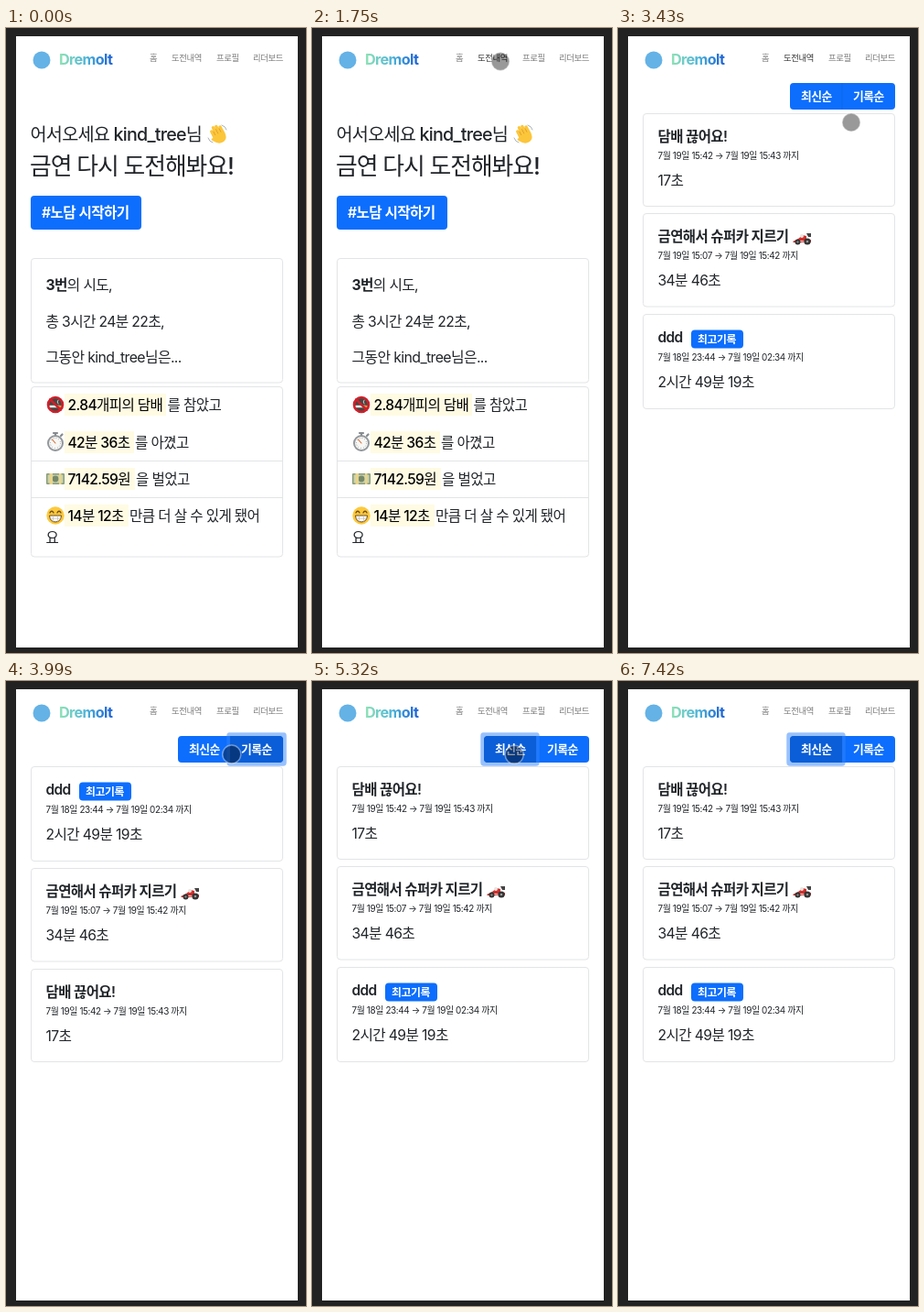
An HTML page for the animation above (7630 ms loop, 328 by 682 pixels).

```html
<!DOCTYPE html>
<html lang="ko">
<head>
<meta charset="utf-8">
<style>
  html, body { margin: 0; width: 100%; height: 100%; overflow: hidden; background: #222; }
  svg { display: block; }
  text {
    font-family: Inter, "Noto Sans CJK KR", "Noto Sans CJK", sans-serif;
    letter-spacing: -.04em;
    white-space: pre;
  }
</style>
</head>
<body>
<svg id="stage" width="328" height="682" viewBox="0 0 328 682">
  <defs>
    <linearGradient id="brand">
      <stop offset="0" stop-color="#8fe3b4"/>
      <stop offset=".5" stop-color="#4cb4d8"/>
      <stop offset="1" stop-color="#1b5fd6"/>
    </linearGradient>
  </defs>
</svg>
<script>
const LOOP = 7630, STEP = 70;
const OPEN = 1820, HOVER = 1680, BY_RECORD = 3850, BY_DATE = 5110;
const BLUE = '#0d6efd', DARK = '#0b5ed7', INK = '#212529', LINE = '#e3e4e6';

const text = (x, cy, size, str, weight = 400, fill = INK, extra = '') =>
  `<text x="${x}" y="${cy + size * .365}" font-size="${size}" font-weight="${weight}" fill="${fill}" ${extra}>${str}</text>`;
const rect = (x, y, w, h, fill, r = 0, extra = '') =>
  `<rect x="${x}" y="${y}" width="${w}" height="${h}" rx="${r}" fill="${fill}" ${extra}/>`;
const box = (y, h) => rect(27.5, y + .5, 275, h, '#fff', 3.5, `stroke="${LINE}"`);
const at = (x, y, body) => `<g transform="translate(${x} ${y})">${body}</g>`;
const group = (id, body) => `<g id="${id}">${body}</g>`;
const stroke = (color, width) => `fill="none" stroke="${color}" stroke-width="${width}" stroke-linecap="round"`;

const icons = {
  wave: `<g transform="rotate(-28)"><path d="M-5-6V2M-1.5-9V1M2-8.5V1M5.5-6V2" ${stroke('#fcc63a', 3.4)}/>
    <path d="M-6.5-1Q0-4 7-1V4Q6 10 0 10Q-5 10-9 3Q-10 0-6.5 1Z" fill="#fcc63a"/>
    <path d="M-3.2-5V-1M.3-6V-1M3.8-5V-1" ${stroke('#d9952b', .7)}/></g>
    <path d="M4-10Q8-9 9-5M-11 4Q-10 8-6 9" ${stroke('#a9b3ba', 1)}/>`,
  noSmoking: `<circle r="8.3" fill="#4a4541"/><path d="M-6 2H4" ${stroke('#f4f0e8', 2.4)}/>
    <path d="M4 2H6" ${stroke('#e8903a', 2.4)}/><path d="M3-1Q1-3 3-5" ${stroke('#ccc', 1)}/>
    <circle r="8" ${stroke('#d0202b', 2.6)}/><path d="M-5.7-5.7L5.7 5.7" ${stroke('#d0202b', 2.6)}/>`,
  watch: `<path d="M0-10V-7M-2-10H2M6-7L7.5-8.5" ${stroke('#858a8e', 2.2)}/>
    <circle cy="1" r="8" fill="#f7f7f5" stroke="#92979b" stroke-width="2"/>
    <circle cy="1" r="5.5" fill="none" stroke="#777" stroke-width="1" stroke-dasharray=".6 2.28"/>
    <path d="M0 1L-3.5-3" ${stroke('#d86a2c', 1.1)}/>`,
  cash: rect(-10, -6, 20, 12, '#8a9c78', 1) + rect(-8.5, -4.5, 17, 9, '#c8d2b2') +
    `<circle r="3.4" fill="#74896a"/>` + rect(-6.5, -6, 3.5, 12, '#e9d48a') + rect(4, -6, 2.5, 12, '#e9d48a'),
  grin: `<circle r="9.7" fill="#fdc93b"/><path d="M-6.5 0H6.5Q6 7 0 7T-6.5 0Z" fill="#fff" stroke="#6b4a1b" stroke-width="1"/>
    <path d="M-6 3.2H6M-2.5 0V6.5M2.5 0V6.5" ${stroke('#b9b3a8', .6)}/>
    <path d="M-6-3Q-4-6.5-2-3M2-3Q4-6.5 6-3" ${stroke('#6b4a1b', 1.4)}/>`,
  car: `<path d="M-10 3L-4 0L1-4L5-3V0L10 1V4H-9Z" fill="#cf2f2c"/><path d="M5-6H10V-2H7Z" fill="#444"/>
    <path d="M-6 2L3 3" ${stroke('#f4e9e4', 1)}/><circle cx="0" cy="-3" r="2" fill="#e9e4de"/>
    <circle cx="-4.5" cy="3.5" r="3" fill="#333"/><circle cx="6" cy="3" r="3.6" fill="#333"/>
    <circle cx="-4.5" cy="3.5" r="1.1" fill="#999"/><circle cx="6" cy="3" r="1.3" fill="#999"/>`
};

const nav = [[157, '홈'], [181, '도전내역'], [230, '프로필'], [270, '리더보드']]
  .map(([x, s], i) => text(x, 32.5, 9.4, s, 400, '#7b7b7b', `id="nav${i}"`)).join('');

const header = '<circle cx="39" cy="35" r="9.5" fill="#64b2e6"/>' +
  text(58, 34.5, 16.2, 'Dremolt', 700, 'url(#brand)') + nav;

const stats = [
  [411, 'noSmoking', '2.84개피의 담배', 175, 176.5, '를 참았고'],
  [452, 'watch', '42분 36초', 140, 141, '를 아꼈고'],
  [492, 'cash', '7142.59원', 141, 142, '을 벌었고'],
  [532, 'grin', '14분 12초', 134, 135, '만큼 더 살 수 있게 됐어']
].map(([y, icon, value, end, x, rest]) =>
  at(54, y, icons[icon]) + rect(64, y - 12, end - 64, 24, '#fffbe3') +
  text(67.5, y, 15.6, value, 500, '#000') + text(x, y, 15.6, rest)).join('');

const home =
  text(26.5, 115.5, 19.7, '어서오세요 kind_tree님', 500) + at(232, 116, icons.wave) +
  text(26, 151, 25.8, '금연 다시 도전해봐요!', 500) +
  rect(27, 183, 121, 37, BLUE, 4) + text(39, 201.5, 15.7, '#노담 시작하기', 600, '#fff') +
  box(251, 135.5) +
  text(43.5, 280.5, 15.7, '<tspan font-weight="700">3번</tspan>의 시도,') +
  text(43.5, 320, 15.7, '총 3시간 24분 22초,') +
  text(43.5, 359.5, 15.9, '그동안 kind_tree님은...') +
  box(391, 185.5) + rect(28, 472, 275, 1, LINE) + rect(28, 512, 275, 1, LINE) +
  stats + text(43.5, 556, 15.6, '요');

const card = (id, h, title, date, time, extra = '', dy = 0) => group(id,
  box(0, h) + text(43.5, 25.7, 15.5, title, 600) + extra +
  text(43.5, 46.5 + dy, 9.95, date) + text(43.5, 73.6 + dy, 15.7, time));

const cards =
  card('quit', 101, '담배 끊어요!', '7월 19일 15:42 → 7월 19일 15:43 까지', '17초') +
  card('super', 101.5, '금연해서 슈퍼카 지르기', '7월 19일 15:07 → 7월 19일 15:42 까지', '34분 46초',
    at(201, 28, icons.car)) +
  card('best', 103, 'ddd', '7월 18일 23:44 → 7월 19일 02:34 까지', '2시간 49분 19초',
    rect(80, 17.5, 57, 20, BLUE, 4) + text(87, 27.5, 11.9, '최고기록', 700, '#fff'), .8);

const left = 'M192 60H245V89H192Q188 89 188 85V64Q188 60 192 60Z';
const right = 'M245 60H299Q303 60 303 64V85Q303 89 299 89H245Z';
const focus = (id, d, x, w) => group(id,
  `<path fill-rule="evenodd" fill="rgba(49,132,253,.5)" d="M${x - 1} 56.3H${x + w + 1}Q${x + w + 3.7} 56.3 ${x + w + 3.7} 60V89Q${x + w + 3.7} 92.7 ${x + w} 92.7H${x}Q${x - 3.7} 92.7 ${x - 3.7} 89V60Q${x - 3.7} 56.3 ${x - 1} 56.3Z${d}"/>` +
  `<path d="${d}" fill="${DARK}"/>`);

const history = cards +
  `<path d="${left}${right}" fill="${BLUE}"/>` + rect(244.5, 60, 1, 29, '#0c66ea') +
  focus('focusLeft', left, 188, 57) + focus('focusRight', right, 245, 58) +
  text(200, 74.5, 12.8, '최신순', 600, '#fff') + text(257, 74.5, 12.8, '기록순', 600, '#fff');

const stage = document.getElementById('stage');
stage.insertAdjacentHTML('beforeend',
  rect(0, 0, 328, 682, '#222') + rect(11, 9, 308, 667, '#fff') + header +
  group('home', home) + group('history', history) +
  '<circle id="touch" r="10" fill="rgba(0,0,0,.4)" stroke="rgba(255,255,255,.4)" stroke-width="1.5"/>');

const $ = id => document.getElementById(id);
const show = (id, on) => $(id).setAttribute('visibility', on ? 'inherit' : 'hidden');
const move = (id, x, y) => $(id).setAttribute('transform', `translate(${x} ${y})`);

// Pointer path: time, x, y
const path = [
  [70, 236, 640], [350, 211, 152], [420, 211, 152], [700, 184, 24], [1050, 184, 24],
  [1120, 208, 48], [1190, 197, 42], [1260, 197, 42], [1400, 206, 36.5], [2030, 206, 36.5],
  [2310, 189, 207], [2800, 192, 207], [3430, 255, 103], [3780, 247, 80], [4410, 246, 80],
  [5110, 221, 80], [5880, 222, 82], [6650, 238, 667], [6930, 240, 695]
];

function pointer(t) {
  const i = path.findIndex(p => p[0] >= t);
  if (i < 1) return path[i < 0 ? path.length - 1 : 0].slice(1);
  const [t0, x0, y0] = path[i - 1], [t1, x1, y1] = path[i];
  const k = (t - t0) / (t1 - t0), e = k * k * (3 - 2 * k);
  return [x0 + (x1 - x0) * e, y0 + (y1 - y0) * e];
}

function draw(time) {
  const t = Math.floor(time % LOOP / STEP) * STEP;
  const opened = t >= OPEN, byRecord = t >= BY_RECORD && t < BY_DATE;
  show('home', !opened);
  show('history', opened);
  show('focusRight', opened && byRecord);
  show('focusLeft', t >= BY_DATE);
  $('nav1').setAttribute('fill', t >= HOVER && t < BY_RECORD ? '#333' : '#7b7b7b');
  move('quit', 0, byRecord ? 314 : 93);
  move('super', 0, byRecord ? 204 : 202);
  move('best', 0, byRecord ? 93 : 312);
  show('touch', t >= 70 && t < 6930);
  move('touch', ...pointer(t));
}

const start = performance.now();
function tick() {
  draw(performance.now() - start);
  requestAnimationFrame(tick);
}
tick();
</script>
</body>
</html>
```
